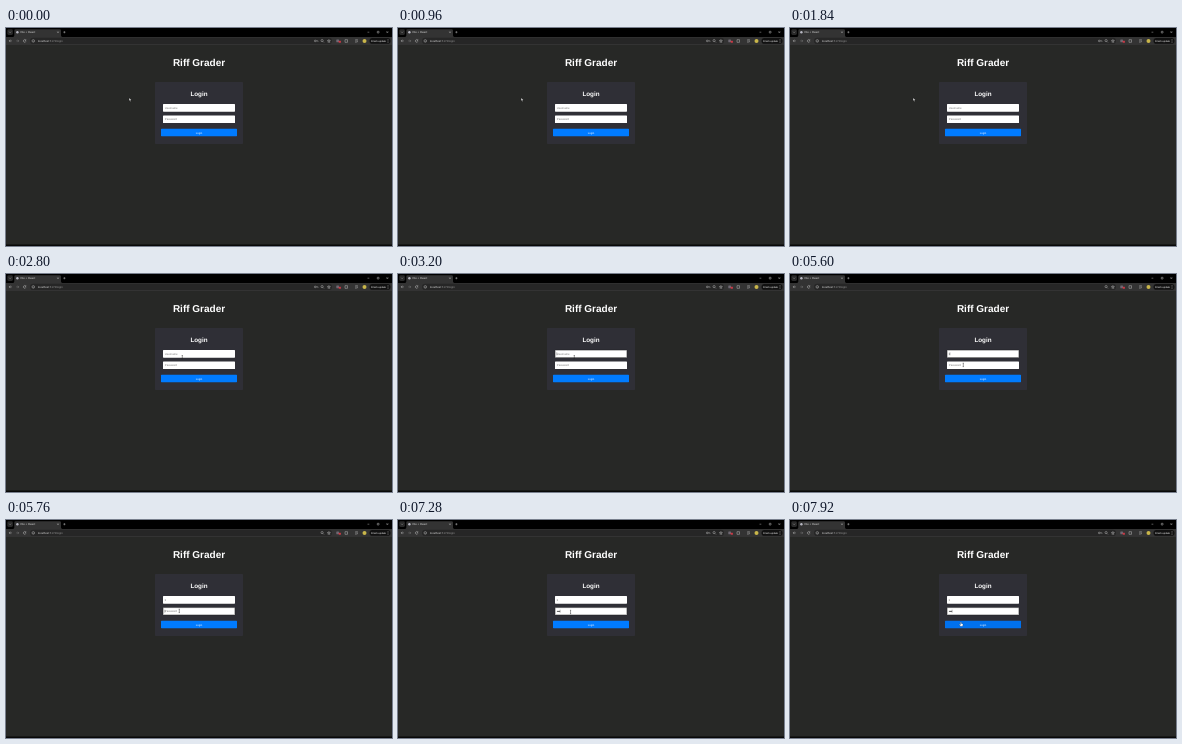
An HTML page for the animation above (8 s loop, 386 px wide and 218 px high).

```html
<!DOCTYPE html>
<html lang="en">
<head>
<meta charset="utf-8">
<title>Login</title>
<style>
  html, body { margin: 0; width: 100%; height: 100%; overflow: hidden; background: #272826; }
  svg { display: block; width: 100vw; height: 100vh; }
  text { font-family: "Liberation Sans", Arial, sans-serif; text-rendering: geometricPrecision; }
  .bold { font-weight: bold; fill: #fff; text-anchor: middle; }
  .ui { font-size: 2.8px; fill: #ddd; }
  .hint { font-size: 2.75px; fill: #757575; }
  .line { fill: none; stroke: #c8c8c8; stroke-width: .45; }
  .ring { fill: none; stroke: #101010; stroke-width: .4; }
</style>
</head>
<body>
<svg viewBox="0 0 386 218">
  <!-- browser window -->
  <rect width="386" height="9" fill="#000"/>
  <rect x="1.3" y="1.3" width="5.6" height="5.6" rx="1.4" fill="#292929"/>
  <path class="line" d="M3.2 3.7l.9.9.9-.9"/>
  <path d="M7 9q1.3 0 1.3-1.4V2.6q0-1.4 1.4-1.4H53.600q1.400 0 1.400 1.400V7.600q0 1.400 1.400 1.400z" fill="#333"/>
  <circle cx="11.400" cy="4.200" r="1.200" fill="#b9b9c4"/>
  <text class="ui" x="14" y="5.200">Vite + React</text>
  <path class="line" d="M51.300 3.500l1.400 1.400m0-1.400l-1.400 1.400M57.300 4.200h2.200m-1.100-1.100v2.200"/>
  <path class="line" d="M361.500 4.200h1.800M371.300 3.300h1.700v1.700h-1.700zM380.500 3.300l1.700 1.700m0-1.700l-1.700 1.700"/>

  <rect y="9" width="386" height="8" fill="#333"/>
  <rect x="24" y="9.800" width="302" height="6.200" rx="3.100" fill="#262626"/>
  <path class="line" d="M5.800 12.900H3.200m1.200-1.200l-1.200 1.200 1.200 1.200M19.800 12.300a1.300 1.300 0 1 0 .1 1M19.900 11.400v1h-1"/>
  <path class="line" opacity=".5" d="M10.200 12.900h2.600m-1.200-1.200l1.200 1.200-1.200 1.200"/>
  <circle class="line" cx="27.300" cy="12.900" r="1.300"/>
  <path class="line" d="M27.300 12.700v.9"/>
  <text class="ui" x="32" y="13.900">localhost<tspan fill="#999">:5173/login</tspan></text>
  <g id="key" class="line"><circle cx="309.200" cy="12.900" r=".8"/><path d="M310 12.900h2.100v.7"/></g>
  <path class="line" d="M317 13.500l.9.900M322.900 11.500l.4 1 1.100.1-.8.700.2 1.100-.9-.6-.9.600.2-1.100-.8-.7 1.100-.1z"/>
  <circle class="line" cx="316.100" cy="12.600" r="1.100"/>
  <rect x="330.300" y="11.600" width="2.700" height="2.700" rx=".5" fill="#6e6873"/>
  <rect x="332.700" y="12.800" width="2.300" height="1.900" rx=".4" fill="#c83a46"/>
  <path class="line" d="M339 11.700h2.500v2.600H339zM349.200 11.800h2.700M349.200 13h1.500M349.200 14.200h1.500M351.400 12.500v1.700"/>
  <circle cx="358.500" cy="12.900" r="2" fill="#c9b64a"/>
  <rect x="363.500" y="10" width="21" height="5.800" rx="2.900" fill="#111"/>
  <text class="ui" x="365" y="13.800" style="font-size:2.500px;fill:#fff">Finish update</text>
  <path d="M382 11.500v3" stroke="#eee" stroke-width=".6" stroke-dasharray=".6"/>

  <!-- page -->
  <rect y="17" width="386" height="201" fill="#272826"/>
  <rect y="216.500" width="386" height="1.500" fill="#080808"/>
  <text class="bold" x="193" y="37.700" font-size="10">Riff Grader</text>
  <rect x="149" y="54" width="88" height="62" rx=".8" fill="#2f2f36"/>
  <text class="bold" x="193" y="68.400" font-size="6.300">Login</text>
  <rect x="157" y="76" width="72" height="7.700" rx=".6" fill="#fff"/>
  <rect x="157" y="87.400" width="72" height="7.700" rx=".6" fill="#fff"/>
  <rect id="ring" class="ring" x="157.200" width="71.600" height="7.300" rx=".5"/>
  <text id="user" class="hint" x="158.800" y="80.900"></text>
  <text id="pass" class="hint" x="158.800" y="92.300"></text>
  <g id="dots" fill="#111"></g>
  <path id="caret" stroke="#111" stroke-width=".3"/>
  <rect id="button" x="155" y="100.800" width="76" height="7.400" rx=".6"/>
  <text class="bold" x="193" y="105.500" font-size="2.700" style="font-weight:normal">Login</text>

  <!-- pointers -->
  <path id="arrow" d="M0 0v2.900l.7-.6.5 1.100.5-.2-.5-1.100h.9z" fill="#fff" stroke="#000" stroke-width=".2"/>
  <path id="beam" d="M-.6-1.700h1.200M0-1.700v3.400M-.6 1.700h1.200" stroke="#222" stroke-width=".45"/>
  <path id="hand" d="M-.5-1.800q.4-.4.8 0v1.300l1.400.4q.4.2.3.700l-.4 1.600h-2.200l-1.100-1.600q0-.5.500-.3l.7.500z" fill="#fff" stroke="#000" stroke-width=".2"/>
</svg>
<script>
const LOOP = 8000, STEP = 80;
const el = id => document.getElementById(id);
const show = (id, on) => el(id).setAttribute("visibility", on ? "visible" : "hidden");
const clamp = v => Math.max(0, Math.min(1, v));
const ease = v => v * v * (3 - 2 * v);

// start, end, x, y
const moves = [
  [2480, 2800, 176.3, 83.2],
  [5360, 5600, 173.3, 90.9],
  [7200, 7600, 166, 101.5],
  [7680, 7920, 171, 104]
];
const keyTimes = [6560, 6800, 6960];

function pointer(t) {
  let x = 123.2, y = 70;
  for (const [from, to, tx, ty] of moves) {
    const k = ease(clamp((t - from) / (to - from)));
    x += (tx - x) * k;
    y += (ty - y) * k;
  }
  return [x, y];
}

function draw(t) {
  const [x, y] = pointer(t);
  const overField = x > 157 && (y > 76 && y < 84 || y > 87.4 && y < 95.2);
  const overButton = y > 100.8;
  show("arrow", !overField && !overButton);
  show("beam", overField);
  show("hand", overButton);
  for (const id of ["arrow", "beam", "hand"])
    el(id).setAttribute("transform", `translate(${x} ${y})`);

  const named = t >= 4480, second = t >= 5760;
  const typed = keyTimes.filter(k => t >= k).length;
  el("user").textContent = named ? "t" : "Username";
  el("user").style.fill = named ? "#111" : "";
  el("pass").textContent = typed ? "" : "Password";
  el("dots").innerHTML = keyTimes.slice(0, typed).map((k, i) =>
    `<circle cx="${159.4 + i * 1.1}" cy="91.3" r=".5"/>`).join("");

  show("ring", t >= 3200);
  el("ring").setAttribute("y", second ? 87.6 : 76.2);
  show("caret", t >= 3200);
  const cx = second ? 158.8 + typed * 1.1 : named ? 159.9 : 158.8;
  el("caret").setAttribute("d", `M${cx} ${second ? 89.7 : 78.3}v3`);
  show("key", !named || typed > 0);

  const hover = clamp((t - 7680) / 240);
  el("button").setAttribute("fill", `rgb(0 ${123 - 10 * hover} ${255 - 17 * hover})`);
}

function frame() {
  const t = performance.now() % LOOP;
  draw(Math.floor(t / STEP) * STEP);
  requestAnimationFrame(frame);
}
frame();
</script>
</body>
</html>
```
